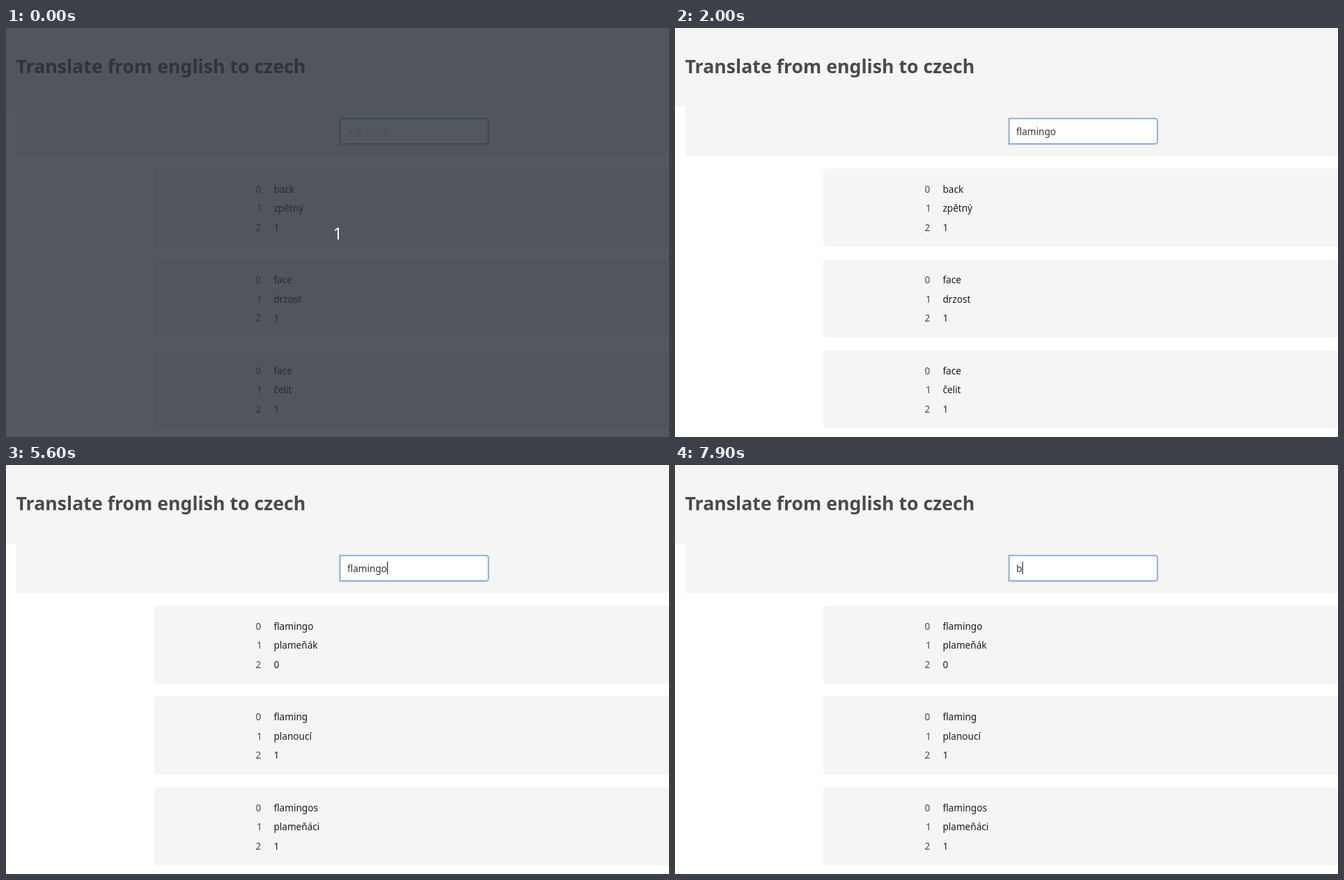
An HTML page for the animation above (8000 ms loop, 952 by 588 pixels).

```html
<!DOCTYPE html>
<html lang="en">
<head>
<meta charset="utf-8">
<title>Translate</title>
<style>
  html, body { margin: 0; width: 100%; height: 100%; overflow: hidden; background: #fffffe; }
  svg { display: block; width: 952px; height: 588px; font: 13.6px "Noto Sans", sans-serif; }
  .panel { fill: #f5f5f4; }
  .title { font-size: 26.7px; font-weight: 600; fill: #4a4a4a; }
  .key { fill: #4a4a4a; text-anchor: end; }
  .value { fill: #1c1c1c; }
</style>
</head>
<body>
<svg viewBox="0 0 952 588">
  <path class="panel" d="M0 0H952V184H15V113H0Z"/>
  <text class="title" x="14.5" y="65.3">Translate from english to czech</text>

  <path d="M479.7 130.4H689.3a3.2 3.2 0 0 1 3.2 3.2V163.3a3.2 3.2 0 0 1 -3.2 3.2H479.7Z"
        fill="none" stroke="#729fdc" stroke-opacity=".25" stroke-width="4"/>
  <path d="M479.7 130.4H689.3a3.2 3.2 0 0 1 3.2 3.2V163.3a3.2 3.2 0 0 1 -3.2 3.2H479.7Z"
        fill="#fffffe" stroke="#6f9cd8" stroke-width="1.3"/>
  <rect id="selection" x="490" y="139" width="57" height="19" fill="#4a90d9"/>
  <text id="typed" x="490" y="154"></text>
  <rect id="caret" y="139" width="1.2" height="18" fill="#222"/>

  <g id="cards"></g>

  <g id="splash">
    <rect width="952" height="588" fill="rgb(41,45,54)" fill-opacity=".8"/>
    <text x="469.6" y="303.5" font-size="24" fill="#fff">1</text>
  </g>
</svg>
<script>
const LOOP = 8000, SPLASH_END = 300, RESULTS_AT = 4400;
const BEFORE = [['back', 'zpětný', 1], ['face', 'drzost', 1], ['face', 'čelit', 1]];
const AFTER = [['flamingo', 'plameňák', 0], ['flaming', 'planoucí', 1], ['flamingos', 'plameňáci', 1]];

// Start time, field text, caret visible, text selected
const STEPS = [
  [0, '', 0], [300, 'f', 1], [500, 'fl', 1], [600, 'fla', 1], [800, 'flam', 0],
  [1000, 'flami', 1], [1200, 'flamin', 1], [1300, 'flaming', 1], [1500, 'flamingo', 1],
  [2000, 'flamingo', 0], [3200, 'flamingo', 1], [4400, 'flamingo', 0], [5600, 'flamingo', 1],
  [6000, 'flamingo', 0, 1], [6800, '', 1], [7900, 'b', 1]
];

const $ = id => document.getElementById(id);
const show = (el, on) => el.setAttribute('visibility', on ? 'visible' : 'hidden');
const typed = $('typed'), caret = $('caret'), selection = $('selection');

$('cards').innerHTML = BEFORE.map((rows, i) => {
  const top = 202.3 + i * 130.5;
  return `<rect class="panel" x="213" y="${top}" width="760" height="112.2" rx="3.4"/>` +
    rows.map((_, j) => {
      const y = top + 34.2 + j * 27.5;
      return `<text class="key" x="${j === 1 ? 367.8 : 366.4}" y="${y}">${j}</text>` +
        `<text class="value" x="384.4" y="${y}"></text>`;
    }).join('');
}).join('');
const values = document.querySelectorAll('.value');

function draw(now) {
  const t = now % LOOP;
  const [, text, caretOn, selected] = STEPS.findLast(step => step[0] <= t);

  typed.textContent = text || 'e.g. hello';
  typed.setAttribute('fill', selected ? '#fff' : text ? '#363636' : '#dcdcdc');
  const width = text ? typed.getComputedTextLength() : 0;
  caret.setAttribute('x', 490.1 + width);
  show(caret, caretOn);
  show(selection, selected);

  const words = (t < RESULTS_AT ? BEFORE : AFTER).flat();
  values.forEach((el, i) => { el.textContent = words[i]; });
  show($('splash'), t < SPLASH_END);
}

const start = performance.now();
function tick() {
  draw(performance.now() - start);
  requestAnimationFrame(tick);
}
tick();
</script>
</body>
</html>
```
